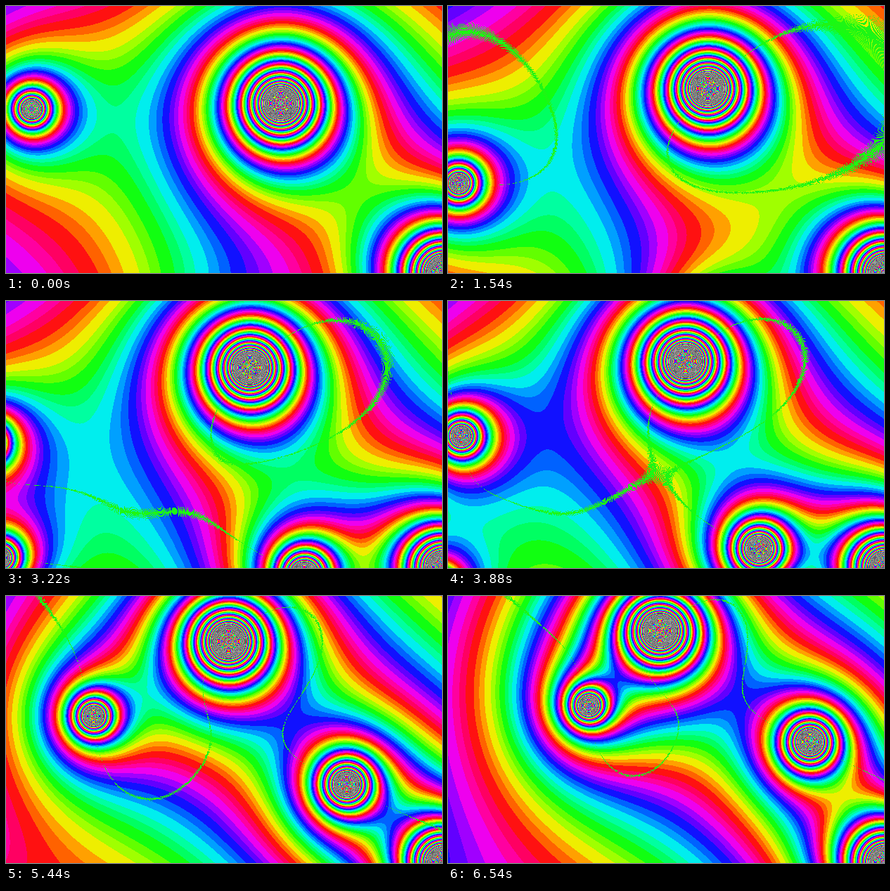
An HTML page with a canvas that plays this animation: 620x380 px, repeating every 6.66 s.

```html
<!DOCTYPE html>
<html lang="en">
<head>
<meta charset="utf-8">
<title>Rainbow field</title>
<style>
  html, body { margin: 0; width: 100%; height: 100%; overflow: hidden; background: #000; }
  canvas { display: block; }
</style>
</head>
<body>
<canvas id="stage" width="620" height="380"></canvas>
<script>
const W = 620, H = 380, STEPS = 60, LOOP = 6660;
const SPEED = 1.51;          // pixels per step for a heading of 1
const LEVELS = 6 * 255;      // 8-bit hue levels around the colour wheel
const ctx = document.getElementById('stage').getContext('2d');
const image = ctx.createImageData(W, H);
const pixels = new Uint32Array(image.data.buffer);

// A charge drifts in a straight line; its hue contribution is strength / distance.
const charge = (strength, x, y, headX, headY) => step => ({
  strength,
  x: x + headX * SPEED * step,
  y: y + headY * SPEED * step
});
const charges = [
  charge(22500, 36, 146, -1, 5),
  charge(72500, 390, 138, -1, -1),
  charge(70500, 621, 379, 0, 0),
  charge(39500, 336, 563.5, 2, -4),
  charge(25000, -246, 244.5, 5, -1)
];

const pack = ([r, g, b]) => (255 << 24 | b << 16 | g << 8 | r) >>> 0;
const still = pack([30, 246, 20]);

// Each channel snaps to four shades; pure and two-channel colours are softened.
const snap = v => v < 0.2 ? 0 : v < 0.5 ? 98 : v < 0.8 ? 160 : 255;
const palette = Uint32Array.from({ length: LEVELS }, (_, level) => {
  const sextant = level / 255;
  const rgb = [0, 2, 4].map(peak => {
    const away = Math.abs(sextant - peak);
    return snap(2 - Math.min(away, 6 - away));
  });
  const sum = rgb[0] + rgb[1] + rgb[2];
  const low = sum === 255 ? 17 : 0, high = sum === 510 ? 238 : 255;
  return pack(rgb.map(v => Math.min(high, Math.max(low, v))));
});

function fillLevels(step, out) {
  const placed = charges.map(at => at(step));
  let p = 0;
  for (let y = 0; y < H; y++) {
    for (let x = 0; x < W; x++) {
      let hue = 75 + 65 * x / W;
      for (const c of placed) {
        const dx = x - c.x, dy = y - c.y;
        hue += c.strength / Math.max(Math.sqrt(dx * dx + dy * dy), 0.05);
      }
      out[p++] = Math.floor(hue * 255 / 60) % LEVELS;
    }
  }
}

const current = new Uint16Array(W * H);
const previous = new Uint16Array(W * H);

function draw(step) {
  fillLevels(step, current);
  if (step) fillLevels(step - 1, previous);
  for (let p = 0; p < pixels.length; p++) {
    // Pixels whose exact hue did not change show the flat green.
    pixels[p] = step && current[p] === previous[p] ? still : palette[current[p]];
  }
  ctx.putImageData(image, 0, 0);
}

// Steps last 100 or 120 ms, four long ones in seven, with two late slips.
function startOf(step) {
  const n = step - (step > 42) - (step > 56);
  return step * 100 + 20 * Math.max(0, Math.floor((4 * n - 1) / 7));
}

let shown = -1;
function tick() {
  const t = performance.now() % LOOP;
  let step = STEPS - 1;
  while (step > 0 && startOf(step) > t) step--;
  if (step !== shown) draw(shown = step);
  requestAnimationFrame(tick);
}
tick();
</script>
</body>
</html>
```
